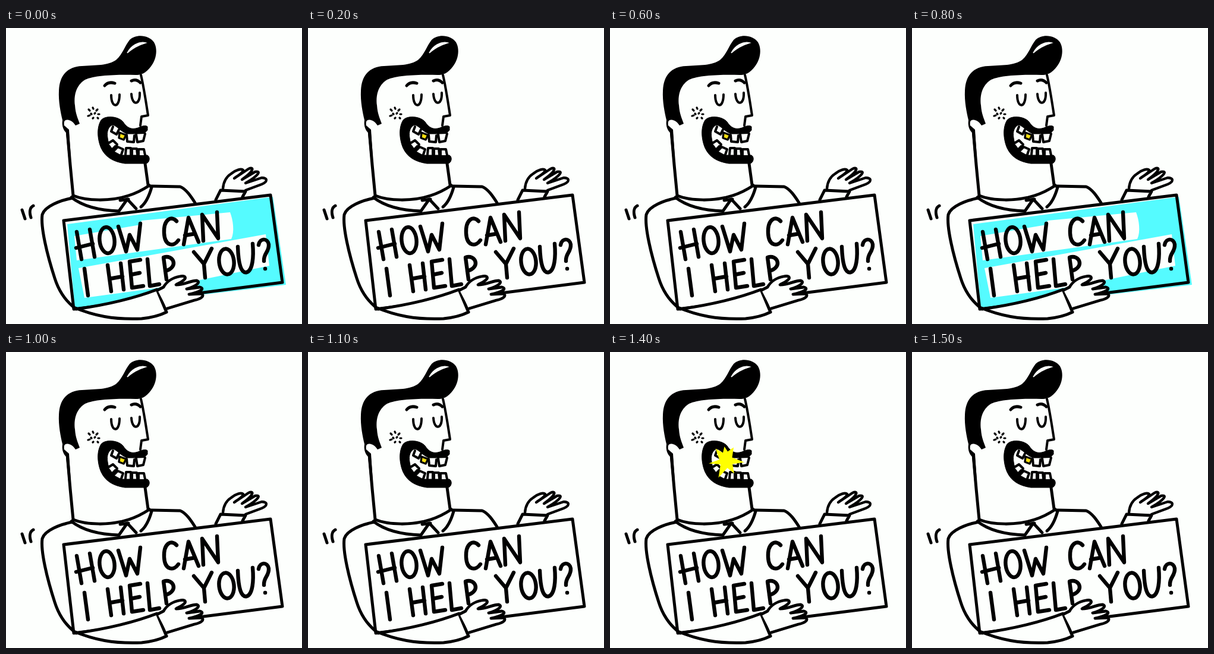
An HTML page that plays this animation: 498 px wide and 498 px high, repeating every 1.6 s.

```html
<!DOCTYPE html>
<html lang="en">
<head>
<meta charset="utf-8">
<title>How can I help you?</title>
<style>
  html, body { margin: 0; width: 100%; height: 100%; overflow: hidden; background: #fdfffd; }
  svg { display: block; width: 100vw; height: 100vh; }
  .ink { fill: none; stroke: #000; stroke-width: 5; stroke-linecap: round; stroke-linejoin: round; }
  .paper { fill: #fdfffd; }
  .thin { stroke-width: 4; }
  .letters { stroke-width: 6.4; }
  .tint { fill: #55fbff; animation: blink .4s step-end infinite; }
  .star {
    fill: #ff0; transform-origin: 196px 183px;
    animation: glint 1.6s step-end infinite;
  }
  @keyframes blink {
    0% { visibility: visible; }
    50%, 100% { visibility: hidden; }
  }
  @keyframes glint {
    0% { visibility: hidden; transform: scale(.5); }
    75% { visibility: visible; transform: scale(.5); }
    81.25% { visibility: visible; transform: none; }
    87.5% { visibility: visible; transform: scale(.5); }
    93.75%, 100% { visibility: hidden; transform: scale(.5); }
  }
</style>
</head>
<body>
<svg viewBox="0 0 498 498" role="img" aria-label="A smiling man holding a sign: How can I help you?">
  <!-- body -->
  <g class="ink">
    <path d="M27 306L32 321M46 299C40 302 39 310 42 319"/>
    <path d="M112 286C91 290 65 300 61 314C58 335 69 381 82 421C88 440 98 456 112 468"/>
    <path d="M244 266L293 267C303 271 311 283 318 294"/>
    <path d="M113 282C135 291 176 292 206 282C222 277 232 271 241 265"/>
    <path d="M110 285C128 299 157 307 190 308L204 288L219 304M241 265L245 268C241 282 236 294 227 301M192 290L206 288"/>
    <path d="M234 228L239 264"/>
    <path d="M103 172L108 230L113 282"/>
  </g>

  <!-- head -->
  <path d="M106 155C98 153 97 158 98 164L106 171L109 218L105 218L101 176C95 170 94 162 95 155C92 142 88 124 89 105C90 80 103 65 128 64C150 62 172 64 186 53C196 44 200 30 208 20C218 10 240 11 249 24C257 38 252 60 236 73C231 77 226 79 218 79C190 78 150 79 133 87C117 97 114 115 116 130C117 145 121 152 124 161L117 164C113 158 110 156 106 155Z"/>
  <path d="M204 42C210 30 223 22 235 25C225 28 214 33 204 42Z" class="paper" stroke="#fdfffd" stroke-width="1.5"/>
  <g class="ink thin">
    <path d="M227 79C232 100 236 128 239 147L228 149L226 164"/>
    <path d="M166 97C171 91 177 91 183 93M211 89C217 86 222 88 226 92" stroke-width="5"/>
    <path d="M177 113C177 135 191 136 191 112M211 111C212 131 226 131 225 109"/>
    <path d="M139 137l2 2M146 134l1 2M154 137l-2 2M157 145l-2 0M150 143l-1 1M143 144l1 1M138 148l3-1M146 152l1-1M155 152l-1-1" stroke-width="3.2"/>
  </g>

  <!-- mouth -->
  <path d="M238 166C235 163 228 165 222 168C210 172 203 167 197 158C190 149 168 146 160 155C152 168 154 188 160 202C167 217 180 225 200 228L236 228C242 226 243 217 238 214L195 214C183 211 172 198 171 185C169 175 172 165 180 163C188 166 192 173 203 178L232 178L238 172Z" stroke="#000" stroke-width="1"/>
  <g class="ink paper thin">
    <path d="M180 166L177 174L186 179L190 171M203 180L204 191L215 192L216 181M219 179L221 192L231 190L234 178"/>
    <path d="M191 176L190 185L198 188L202 180Z" style="fill:#f6df10" stroke-width="3.4"/>
    <path d="M172 194L180 189L187 196L180 203M181 207L188 200L197 204L194 213M201 213L202 202L210 202L210 213M212 213L212 203L220 203L221 213M223 214L223 204L232 204L234 214"/>
  </g>
  <path class="star" d="M189 135L200 152L220 138L215 172L256 188L216 194L222 226L199 207L169 240L176 195L136 192L172 179L159 142L184 156Z"/>

  <!-- far hand -->
  <g class="ink">
    <path d="M353 289L361 273L403 275L398 284"/>
    <path d="M365 270C366 258 371 250 379 245C386 239 396 236 399 239C399 244 389 249 384 253L408 237C417 233 419 239 397 255L419 242C429 240 427 247 403 261L430 252C441 252 440 259 430 263L403 273" stroke-width="4.4"/>
  </g>

  <!-- sign -->
  <path class="paper" d="M97 324L445 281L465 428L114 473Z"/>
  <g class="tint">
    <path d="M103 330L449 284L471 432L116 474Z"/>
    <path class="paper" d="M115 350L226 331L228 324L377 310C382 323 385 343 379 355L119 391Z"/>
    <path class="paper" d="M122 404L437 347L443 400L326 424L250 438L132 454Z"/>
  </g>
  <path class="ink" d="M97 324L445 281L465 428L114 473Z"/>
  <g class="ink letters">
    <path d="M119 343L127 389M141 339L149 385M118 370L146 363"/>
    <ellipse cx="170" cy="357" rx="12.5" ry="22" transform="rotate(-6 170 357)"/>
    <path d="M189 334L202 376L208 348L221 373L226 329"/>
    <path d="M287 325C278 315 265 322 266 345C267 367 282 369 290 357"/>
    <path d="M299 364L307 319L324 360M301 349L318 346"/>
    <path d="M332 358L330 314L357 354L355 310"/>
    <path d="M132 405L138 450"/>
    <path d="M171 399L177 443M193 396L198 440M174 422L196 418"/>
    <path d="M226 390L208 393L212 437L231 434M210 415L225 412"/>
    <path d="M238 389L242 434L258 431"/>
    <path d="M270 423L265 386C281 380 292 402 268 409"/>
    <path d="M316 377L333 397L346 371M333 397L335 420"/>
    <ellipse cx="371" cy="393" rx="12.5" ry="21.5" transform="rotate(-6 371 393)"/>
    <path d="M390 368C391 396 395 413 405 411C415 408 417 385 415 363"/>
    <path d="M425 365C427 353 440 353 442 364C443 377 433 379 434 392M436 405l.1 0"/>
  </g>

  <!-- near arm -->
  <path class="paper" d="M116 472C155 468 210 457 254 440L270 479C250 487 195 494 150 482Z"/>
  <g class="ink">
    <path d="M118 473C160 467 210 457 254 440L270 478M114 470C148 484 180 491 228 489C248 487 260 483 270 478"/>
    <path class="paper" d="M255 441L265 436C270 427 280 420 292 418C300 416 303 419 301 422C297 427 291 429 286 432C301 432 310 425 321 425C329 428 318 435 304 439L326 436C335 438 328 444 308 448L329 447C335 451 327 456 317 458L271 472" stroke-width="4.8"/>
  </g>
</svg>
</body>
</html>
```
